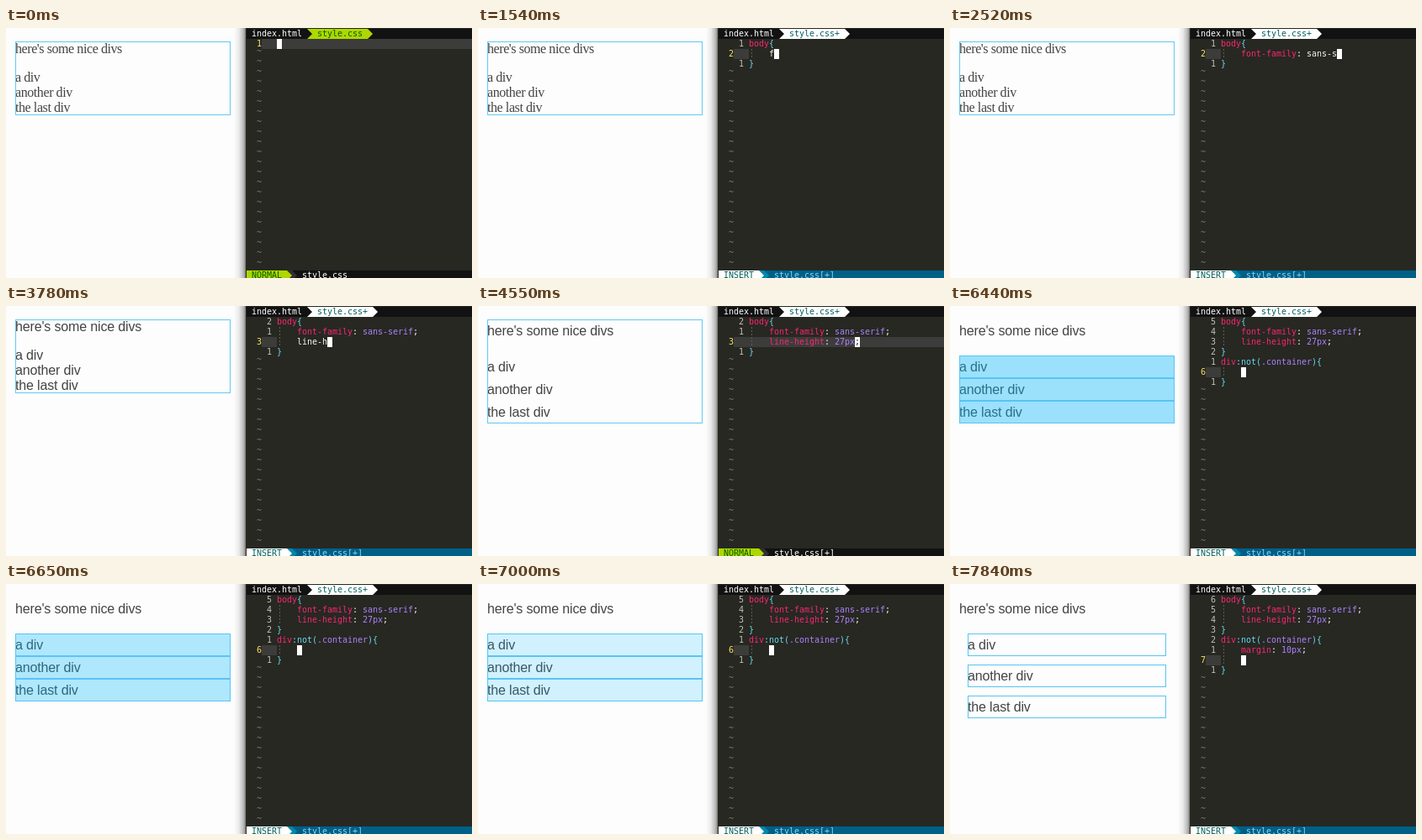
Write an HTML page that moves like this. It is 554x298 px and loops after 8 s.

```html
<!DOCTYPE html>
<html lang="en">
<head>
<meta charset="utf-8">
<title>Live CSS editing</title>
<style>
html, body { margin: 0; width: 100%; height: 100%; overflow: hidden; background: #fdfdfd; }
#stage { position: relative; width: 554px; height: 298px; overflow: hidden; }
#stage div, #stage i, #stage b { box-sizing: border-box; }

#page { position: absolute; left: 11px; top: 16px; width: 256px; color: #444;
  font: 16px/18px "Liberation Serif", serif; letter-spacing: -.42px; }
#page.sans { font-family: "Liberation Sans", sans-serif; letter-spacing: -.15px; }
#page.wide { font-family: "DejaVu Sans", sans-serif; letter-spacing: 0; }
#page p { margin: 0 0 16px; }
#page div { position: relative; }
#page.lit div::after { content: ""; position: absolute; inset: 0; border: 1px solid #58c4f4; background: rgba(0, 180, 250, var(--glow)); }
#page.spaced div { margin: 0 10px 10px; }
#frame { position: absolute; left: 11px; top: 16px; width: 256px; border: 1px solid #62c8f5; }
#shade { position: absolute; left: 271px; top: 0; width: 15px; height: 298px;
  background: linear-gradient(90deg, rgba(0,0,0,0), rgba(0,0,0,.08) 40%, rgba(0,0,0,.27) 75%, rgba(0,0,0,.5) 93%, #272822 93%); }

#vim { position: absolute; left: 286px; top: 0; width: 268px; height: 298px; overflow: hidden; background: #272822; color: #f8f8f2;
  font: 10px/12px "DejaVu Sans Mono", monospace; letter-spacing: -.02px; white-space: pre; }
#vim div, #vim i, #vim b { position: absolute; font-style: normal; font-weight: normal; }
#rows { left: 0; top: 0; }
.row { left: 0; width: 268px; height: 12px; }
.row i { left: 36px; }
.row b { right: 238px; color: #c0c0b8; }
.row.now b { left: 12px; right: auto; color: #ffe45c; }
.row.now::before { content: ""; position: absolute; left: 18px; width: 18px; height: 12px; background: #3c3c3a; }
.normal .row.now::before { width: 250px; }
.row.in::after { content: ""; position: absolute; left: 39px; top: 0; width: 1px; height: 12px;
  background: repeating-linear-gradient(#5f5f5a 0 2px, transparent 2px 4px); }
.row.void { padding-left: 12px; margin-top: -3px; color: #7a7a74; }
.tag { color: #f92672; } .op { color: #66d9ef; } .val { color: #ae81ff; }
#cursor { width: 6px; height: 12px; background: #fff; color: #222; }

#tabs { left: 0; top: 1px; width: 268px; height: 12px; background: #121212; color: #fff; }
#tabs i { left: 6px; }
#tab { left: 72px; top: 0; height: 12px; padding: 0 12px; background: #afd700; color: #005f00;
  clip-path: polygon(0 0, calc(100% - 6px) 0, 100% 50%, calc(100% - 6px) 100%, 0 100%, 6px 50%); }
#tab.dirty { background: #fff; color: #005f5f; }
#bar { left: 0; top: 289px; width: 268px; height: 12px; background: #005f87; color: #87d7ff; }
#mode { left: 0; width: 54px; height: 12px; padding-left: 6px; background: #fff; color: #005f5f; z-index: 1;
  clip-path: polygon(0 0, 48px 0, 54px 50%, 48px 100%, 0 100%); }
#bar b { left: 48px; width: 12px; height: 12px; background: #0087af; clip-path: polygon(0 0, 6px 0, 100% 50%, 6px 100%, 0 100%); }
#file { left: 66px; }
.normal #bar { background: #121212; color: #fff; }
.normal #mode { background: #afd700; color: #005f00; }
.normal #bar b { background: #303030; }
</style>
</head>
<body>
<div id="stage">
  <div id="page"><p>here's some nice divs</p><div>a div</div><div>another div</div><div>the last div</div></div>
  <div id="frame"></div>
  <div id="shade"></div>
  <div id="vim">
    <div id="tabs"><i>index.html</i><div id="tab"></div></div>
    <div id="rows"></div>
    <div id="cursor"></div>
    <div id="bar"><div id="mode"></div><b></b><div id="file"></div></div>
  </div>
</div>
<script>
const LOOP = 8000, TICK = 70, ROWS = 23, TAB = '    ';
const $ = id => document.getElementById(id);

// Each run types from one length to another: [start, from, to, ticks]
const typing = {
  body: ['body{', [420, 1, 5, 4]],
  font: ['font-family: sans-serif;', [1540, 1, 15, 12], [2380, 16, 24, 7]],
  line: ['line-height: 27px;', [3430, 1, 6, 6], [3850, 7, 15, 6], [4270, 16, 18, 3]],
  div: ['div:not(.container){', [5250, 1, 20, 14]],
  margin: ['margin: 10px;', [7070, 1, 9, 8], [7630, 10, 13, 3]]
};

function typed(name, t) {
  const [text, ...runs] = typing[name];
  let n = 0;
  for (const [start, from, to, ticks] of runs) {
    if (t < start) break;
    const k = Math.min(1, (t - start) / TICK / (ticks - 1));
    n = Math.round(from + (to - from) * k);
  }
  return text.slice(0, n);
}

function edit(t) {
  const lines = [typed('body', t)];
  let row = 0, insert = t >= 420;
  if (t >= 700) { lines.push(t >= 840 ? '}' : ''); row = 1; insert = t < 910 || t >= 980; }
  if (t >= 980) lines.splice(1, 0, TAB + typed('font', t));
  if (t >= 2870) { lines.splice(2, 0, TAB + typed('line', t)); row = 2; }
  if (t >= 4550) insert = false;
  if (t >= 5110) row = 3;
  if (t >= 5180) { lines.push(typed('div', t)); row = 4; insert = true; }
  if (t >= 6230) { lines.push(t >= 6300 ? '}' : ''); row = 5; insert = t < 6370 || t >= 6440; }
  if (t >= 6440) lines.splice(5, 0, TAB + typed('margin', t));
  if (t >= 7840) { lines.splice(6, 0, TAB); row = 6; }
  const len = lines[row].length;
  return { lines, row, insert, col: insert ? len : Math.max(0, len - 1) };
}

const syntax = /(^(?:body|div)\b|\b(?:font-family|font|line-height|margin)(?=:|$))|(:not\(?|[{}()])|(\.container|sans-serif|\b\d+(?:px)?)/g;
const paint = s => s.replace(syntax, (m, tag, op) => `<span class="${tag ? 'tag' : op ? 'op' : 'val'}">${m}</span>`);

function drawEditor(t) {
  const { lines, row, insert, col } = edit(t);
  const dirty = t >= 420;
  let html = '';
  for (let r = 0; r < ROWS; r++) {
    const s = lines[r], top = `style="top:${13 + r * 12}px"`;
    if (s === undefined) { html += `<div class="row void" ${top}>~</div>`; continue; }
    const cls = (r === row ? ' now' : '') + (s.startsWith(TAB) ? ' in' : '');
    html += `<div class="row${cls}" ${top}><b>${r === row ? r + 1 : Math.abs(r - row)}</b><i>${paint(s)}</i></div>`;
  }
  $('rows').innerHTML = html;
  $('vim').className = insert ? '' : 'normal';
  $('cursor').style.left = 36 + col * 6 + 'px';
  $('cursor').style.top = 13 + row * 12 + 'px';
  $('cursor').textContent = lines[row][col] || '';
  $('tab').className = dirty ? 'dirty' : '';
  $('tab').textContent = dirty ? 'style.css+' : 'style.css';
  $('mode').textContent = insert ? 'INSERT' : 'NORMAL';
  $('file').textContent = dirty ? 'style.css[+]' : 'style.css';
}

function drawPage(t) {
  const font = typed('font', t), line = typed('line', t), page = $('page');
  const wide = font.endsWith(' sans'), lit = t >= 6440;
  let height = wide ? 19 : 18;
  // A bare 27 multiplies the font size; the outline follows one tick later
  if (/27p?$/.test(line)) height = 27 * 16;
  if (line.includes('27px')) height = 27;
  const box = line.endsWith('27') ? 18 : height;
  page.style.lineHeight = height + 'px';
  page.style.setProperty('--glow', Math.max(0, (7485 - t) * .00037));
  page.classList.toggle('wide', wide);
  page.classList.toggle('sans', font.includes('sans-serif'));
  page.classList.toggle('lit', lit);
  page.classList.toggle('spaced', typed('margin', t).includes('px'));
  $('frame').style.height = box * 4 + 16 + 'px';
  $('frame').style.display = lit ? 'none' : '';
}

let last = -1;
function loop(now) {
  const tick = Math.floor(now % LOOP / TICK);
  if (tick !== last) {
    last = tick;
    drawEditor(tick * TICK);
    drawPage(tick * TICK);
  }
  requestAnimationFrame(loop);
}
loop(performance.now());
</script>
</body>
</html>
```
